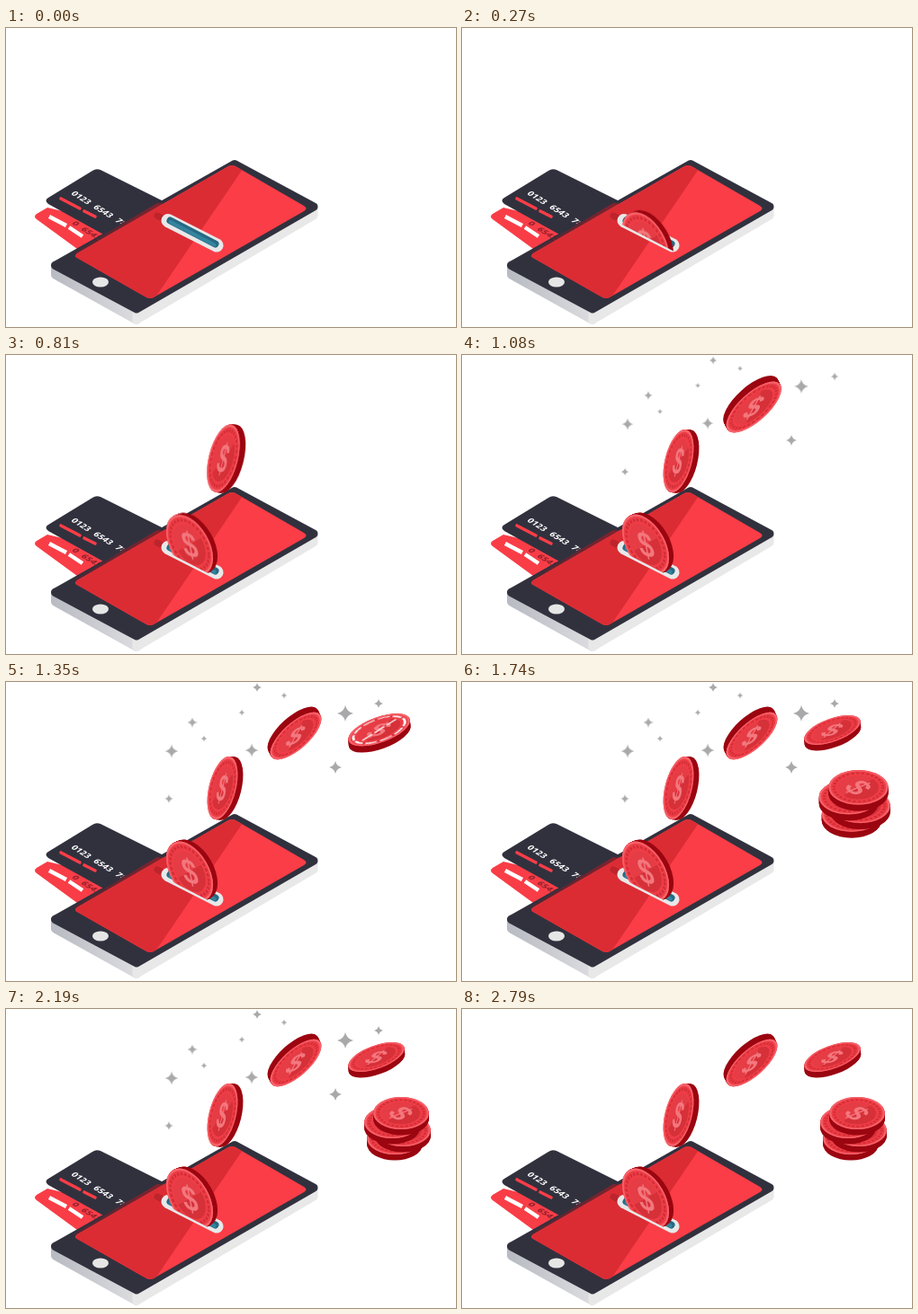
Recreate the animation shown at these times as an HTML page. Size 500x333 px, loop 3600 ms.

```html
<!DOCTYPE html>
<html lang="en">
<head>
<meta charset="utf-8">
<title>Coins and phone</title>
<style>
html, body { margin: 0; width: 100%; height: 100%; overflow: hidden; background: #fff; }
svg { display: block; width: 100%; height: 100%; }
.round { stroke-linejoin: round; stroke-width: 9; }
.line { fill: none; stroke-linecap: round; }
.digits { font: italic bold 10px "Open Sans", sans-serif; word-spacing: 3.5px; }
.dollar { font: bold 36px "Liberation Sans", Arial, sans-serif; text-anchor: middle; fill: #f3777d; }

#rising, .pop, .star, .glint { animation: 3600ms linear infinite; }
#rising { animation-name: rise; }
#tall { animation-name: popTall; transform-origin: 228px 155px; }
#tilted { animation-name: popTilted; transform-origin: 294px 86px; }
#flat { animation-name: popFlat; transform-origin: 380px 56px; }
#stack { animation-name: popStack; transform-origin: 420px 98px; }
.star { animation-name: twinkle; }
.glint { animation-name: glint; fill: none; stroke: #fff; stroke-width: 2.4; stroke-dasharray: 12 3; }

@keyframes rise {
  0% { transform: translateY(58px); animation-timing-function: cubic-bezier(.33, .67, .67, 1); }
  24.4%, 100% { transform: none; }
}
@keyframes popTall {
  0%, 19.17% { transform: scale(0); }
  22.5% { transform: scale(1.08); animation-timing-function: ease-out; }
  27.5%, 100% { transform: none; }
}
@keyframes popTilted {
  0%, 26.67% { transform: scale(0); }
  30% { transform: scale(1.08); animation-timing-function: ease-out; }
  35%, 100% { transform: none; }
}
@keyframes popFlat {
  0%, 34.17% { transform: scale(0); }
  37.5% { transform: scale(1.1); animation-timing-function: ease-out; }
  42.5%, 100% { transform: none; }
}
@keyframes popStack {
  0%, 45.56% { transform: scale(0); }
  48.4% { transform: scale(1.09); animation-timing-function: ease-out; }
  54%, 100% { transform: none; }
}
@keyframes twinkle {
  0%, 25% { transform: scale(0); }
  30.8%, 62.5% { transform: none; }
  73.3%, 100% { transform: scale(0); }
}
@keyframes glint {
  0%, 38% { opacity: 1; }
  38.01%, 100% { opacity: 0; }
}
</style>
</head>
<body>
<svg viewBox="0 0 500 333" preserveAspectRatio="none">
  <defs>
    <clipPath id="aboveSlot"><path d="M150 0H300V285L238 250L178 219L150 204Z"/></clipPath>
    <clipPath id="screen"><path d="M247 154Q251 152 255 154L331 198Q336 201 331 204L164 300Q160 302 156 300L79 256Q75 254 79 251Z"/></clipPath>
    <linearGradient id="side"><stop stop-color="#b9bcc3"/><stop offset="1" stop-color="#dcdce0"/></linearGradient>
    <linearGradient id="tint"><stop stop-color="#4a2934"/><stop offset="1" stop-color="#85222c"/></linearGradient>
  </defs>

  <g id="cards">
    <path d="M46 200L34 207Q30 210 34 213L90 254L130 220Z" fill="#f93d47"/>
    <path d="M48 210L67 220M70 222L85 232" fill="none" stroke="#fff" stroke-width="4.5"/>
    <text class="digits" transform="matrix(.87 .55 -.6 .5 73 218)" fill="#8c202b">0 6543</text>
    <path d="M96 159Q100 156 105 158L175 193L112 232L47 196Q42 192 47 189Z" fill="#31313e"/>
    <path class="line" d="M61 190L82 201M87 204L99 210" stroke="#f93d47" stroke-width="3.6"/>
    <text class="digits" transform="matrix(.87 .54 -.6 .6 72 185)" fill="#fff">0123 6543 7<tspan fill="#f4a0a5">8</tspan></text>
  </g>

  <g id="phone">
    <path class="round" d="M54.5 264L145 313V325.5L54.5 275Z" fill="url(#side)" stroke="url(#side)"/>
    <path class="round" d="M145 313L342 199V209L145 325.5Z" fill="#e8e8e8" stroke="#e8e8e8"/>
    <path class="round" d="M254 151.5L342 199L145 313L54.5 264.5Z" fill="#31313e" stroke="#31313e"/>
    <path d="M76 250L168 195L177 196L80 252Z" fill="url(#tint)"/>
    <g clip-path="url(#screen)">
      <path d="M60 140H350V310H60Z" fill="#fa3d47"/>
      <path d="M263 157L164 303L60 260L245 145Z" fill="#db2c34"/>
    </g>
    <ellipse cx="105" cy="283" rx="9" ry="5.6" fill="#e6e6e6"/>
    <path class="line" d="M168 209L176 213" stroke="#bd242c" stroke-width="7"/>
    <path class="line" d="M180 214.5L234 242" stroke="#e8e8e8" stroke-width="15"/>
    <path class="line" d="M182.5 214.5L232.5 240.5" stroke="#246a84" stroke-width="8"/>
    <path class="line" d="M182.5 216L231.5 241.5" stroke="#35849f" stroke-width="4"/>
  </g>

  <g id="stars" fill="#a9a9ab"></g>
  <g clip-path="url(#aboveSlot)"><g id="rising"></g></g>
  <g id="tall" class="pop"></g>
  <g id="tilted" class="pop"></g>
  <g id="flat" class="pop"></g>
  <g id="stack" class="pop"></g>
</svg>
<script>
const RADIUS = 30;
const byId = id => document.getElementById(id);

// A round face under an affine transform, extruded along (dx, dy).
function coin({ x, y, shape, dx, dy, turn = 0, extra = '' }) {
  const steps = 8;
  let rim = '';
  for (let i = steps; i > 0; i--) {
    const k = i / steps;
    rim += `<g transform="translate(${x + dx * k} ${y + dy * k}) ${shape}"><circle r="${RADIUS}"/></g>`;
  }
  return `<g fill="#9b0610">${rim}</g>
    <g transform="translate(${x} ${y}) ${shape}">
      <circle r="${RADIUS}" fill="#ee3d47"/>
      <circle r="28.8" fill="none" stroke="#f5646b" stroke-width="2"/>
      <circle r="24.5" fill="none" stroke="#d22d36" stroke-width="3" stroke-dasharray="3 2.13"/>
      <circle r="20.5" fill="#e53c45"/>
      <path d="M-14.5 14.5A20.5 20.5 0 0 0 14.5 -14.5Z" fill="#d63039"/>
      <text class="dollar" y="12.5" transform="rotate(${turn})">$</text>
      ${extra}
    </g>`;
}

byId('rising').innerHTML = coin({ x: 204, y: 211, shape: 'matrix(.87 .5 0 1 0 0)', dx: 5, dy: -2, turn: -15 });
byId('tall').innerHTML = coin({ x: 240.5, y: 118, shape: 'rotate(14) scale(.5 1.2)', dx: 6, dy: .5 });
byId('tilted').innerHTML = coin({ x: 322, y: 60, shape: 'rotate(-42) scale(1.2 .49)', dx: -3, dy: -6, turn: 50 });

const glint = `<circle class="glint" r="25"/><path class="glint" d="M-18 10L18 -10"/>`;
byId('flat').innerHTML = coin({ x: 411.5, y: 53.5, shape: 'rotate(-20) scale(1.1 .43)', dx: .5, dy: 6.5, turn: 45, extra: glint });

const pile = [[432, 144], [441, 135], [429, 126], [439, 116]];
byId('stack').innerHTML = pile
  .map(([x, y]) => coin({ x, y, shape: 'scale(1.03 .6)', dx: 0, dy: 6.5, turn: 55 }))
  .join('');

const stars = [
  [279, 6, 5], [309, 15, 3.2], [377, 35, 9], [414, 24, 5], [262, 34, 3.2], [207, 45, 5.5],
  [220, 63, 3.2], [184, 77, 7.3], [273, 76, 7.3], [366, 95, 7], [181, 130, 4.8]
];
byId('stars').innerHTML = stars.map(([x, y, r]) =>
  `<g transform="translate(${x} ${y}) scale(${r})"><path class="star"
    d="M0 -1Q.18 -.18 1 0Q.18 .18 0 1Q-.18 .18 -1 0Q-.18 -.18 0 -1Z"/></g>`).join('');
</script>
</body>
</html>
```
